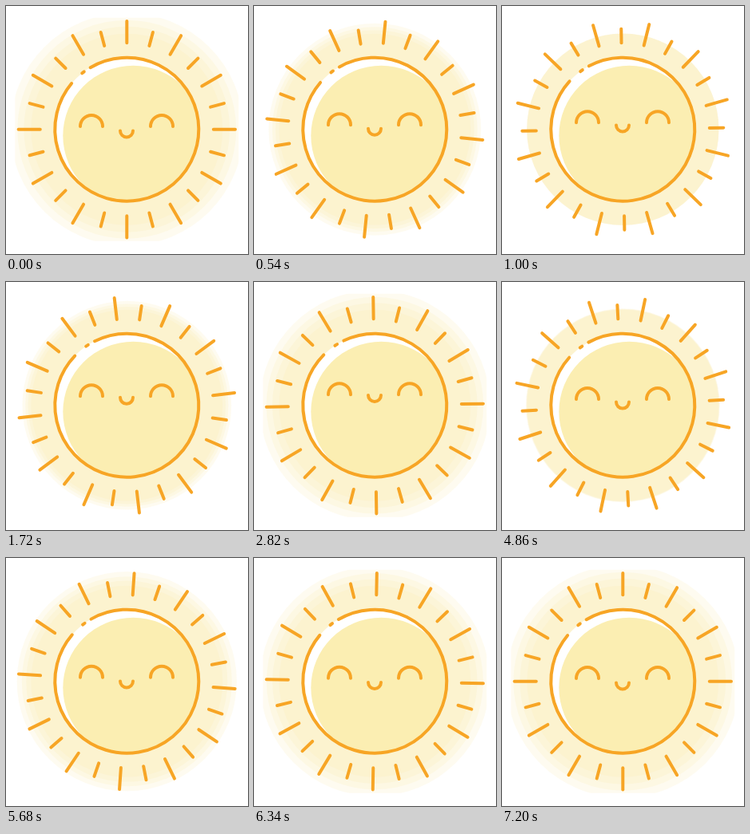
Recreate the animation shown at these times as an HTML page. Size 303 by 311 pixels, loop 7.22 s.

```html
<!DOCTYPE html>
<html lang="en">
<head>
<meta charset="utf-8">
<title>Smiling sun</title>
<style>
  html, body { margin: 0; width: 100%; height: 100%; overflow: hidden; background: #fff; }
  svg { display: block; width: 100vw; height: 100vh; }
  .line { fill: none; stroke: #f7a525; stroke-width: 4; stroke-linecap: round; }
</style>
</head>
<body>
<svg viewBox="0 0 303 311">
  <defs>
    <clipPath id="stage"><rect x="11.3" y="14.7" width="280" height="280"/></clipPath>
    <clipPath id="disc"><circle cx="151.3" cy="154.7" r="90"/></clipPath>
  </defs>
  <g id="halo" clip-path="url(#stage)" fill="#f7e09d" fill-opacity=".15"></g>
  <g id="rays" class="line"></g>
  <circle cx="151.3" cy="154.7" r="90" fill="#fff"/>
  <circle cx="159.3" cy="162.7" r="88" fill="#fbeeb2" clip-path="url(#disc)"/>
  <g id="outline" class="line"></g>
  <path id="eyes" class="line" d="M93 151a14 14 0 0 1 28 0M181 151a14 14 0 0 1 28 0"/>
  <path id="mouth" class="line" d="M143 156.5a8 8 0 0 0 16 0"/>
</svg>
<script>
const LOOP = 7220, HALF = 3600;
const CX = 151.3, CY = 154.7;
const HALO_MIN = 120, HALO_MAX = [120, 129, 137, 146];
const HALO_SHRINK = 0.3;

const byId = id => document.getElementById(id);
const [halo, rays, outline, eyes, mouth] =
  ['halo', 'rays', 'outline', 'eyes', 'mouth'].map(byId);

function add(parent, name, attrs) {
  const el = document.createElementNS('http://www.w3.org/2000/svg', name);
  for (const key in attrs) el.setAttribute(key, attrs[key]);
  return parent.appendChild(el);
}

// Angle in degrees, clockwise from the top.
function polar(radius, angle) {
  const a = angle * Math.PI / 180;
  return `${CX + radius * Math.sin(a)} ${CY - radius * Math.cos(a)}`;
}

function addArc(from, to) {
  const large = to - from > 180 ? 1 : 0;
  add(outline, 'path', { d: `M${polar(90, from)}A90 90 0 ${large} 1 ${polar(90, to)}` });
}

function bezier(x1, y1, x2, y2) {
  const curve = (a, b, s) => 3 * a * s * (1 - s) ** 2 + 3 * b * s * s * (1 - s) + s ** 3;
  return x => {
    let low = 0, high = 1;
    for (let i = 0; i < 30; i++) {
      const mid = (low + high) / 2;
      if (curve(x1, x2, mid) < x) low = mid; else high = mid;
    }
    return curve(y1, y2, (low + high) / 2);
  };
}
const ease = bezier(0.25, 0.1, 0.25, 1);
const easeInOut = bezier(0.42, 0, 0.58, 1);

const rings = HALO_MAX.map(() => add(halo, 'circle', { cx: CX, cy: CY }));
for (let i = 0; i < 24; i++) {
  const tip = i % 2 ? 126 : 135.7;
  add(rays, 'path', { d: `M${polar(108.5, i * 15)}L${polar(tip, i * 15)}` });
}
addArc(-30.5, 309.8);
addArc(-38.5, -36.5);

function draw(time) {
  const t = Math.min(time % LOOP, 2 * HALF);
  const lift = t < HALF ? ease(t / HALF) : 1 - ease((t - HALF) / HALF);
  const phase = t % HALF / HALF;
  const glow = phase < HALO_SHRINK
    ? 1 - easeInOut(phase / HALO_SHRINK)
    : ease((phase - HALO_SHRINK) / (1 - HALO_SHRINK));

  rays.setAttribute('transform', `rotate(${30 * lift} ${CX} ${CY})`);
  outline.setAttribute('transform', `rotate(${5 * lift} ${CX} ${CY})`);
  eyes.setAttribute('transform', `translate(0 ${-10 * lift})`);
  mouth.setAttribute('transform', `translate(0 ${-15 * lift})`);
  rings.forEach((ring, i) =>
    ring.setAttribute('r', HALO_MIN + (HALO_MAX[i] - HALO_MIN) * glow));
}

const start = performance.now();
function tick() {
  draw(performance.now() - start);
  requestAnimationFrame(tick);
}
draw(0);
requestAnimationFrame(tick);
</script>
</body>
</html>
```
